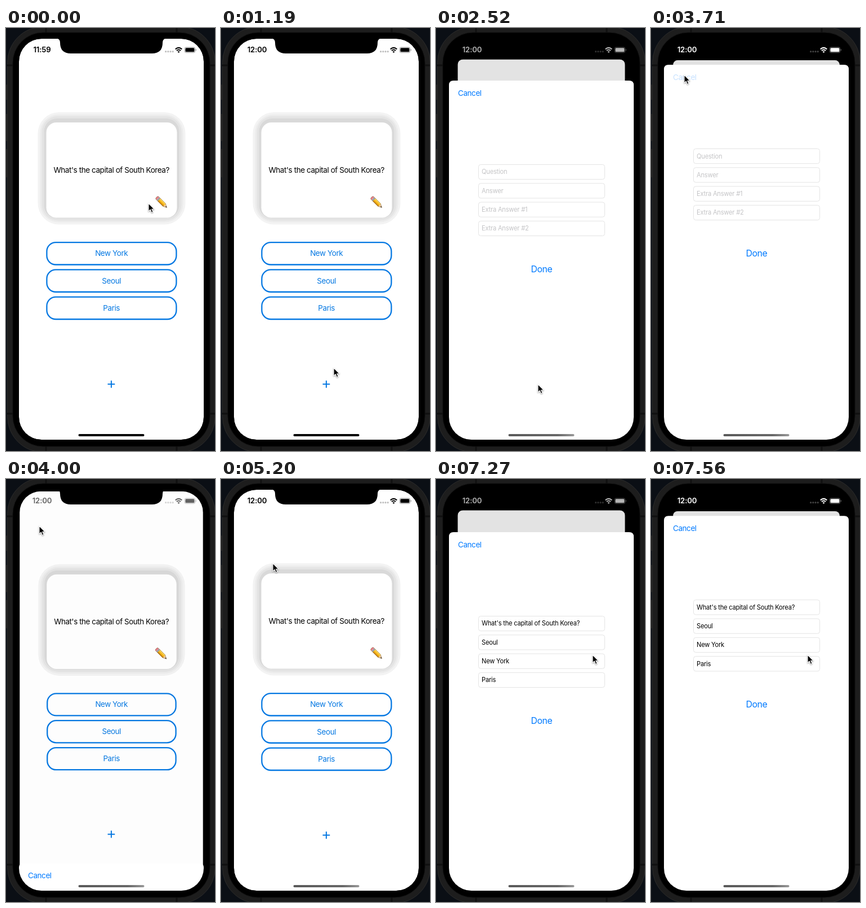
Write an HTML page that moves like this. It is 371 px wide and 748 px high and loops after 8 s.

```html
<!DOCTYPE html>
<html lang="en">
<head>
<meta charset="utf-8">
<title>Quiz card app</title>
<style>
html, body { margin: 0; width: 100%; height: 100%; overflow: hidden; background: #0b0f15; }
svg { display: block; }
text { font-family: Inter, Roboto, sans-serif; font-size: 13.47px; letter-spacing: -.031em; }
.mid { text-anchor: middle; }
.main-blue { fill: #0578e2; }
.blue { fill: #007aff; }
.clock { font-size: 13.2px; font-weight: 600; letter-spacing: -.01em; }
.field { font-size: 11.1px; letter-spacing: -.018em; }
.done { font-size: 15.85px; }
</style>
</head>
<body>
<svg width="371" height="748" viewBox="0 0 371 748">
  <defs>
    <clipPath id="screenClip"><rect x="23" y="19" width="328" height="709" rx="40"/></clipPath>
    <clipPath id="backClip"><rect id="backShape" x="23" y="19" width="328" height="709" rx="40"/></clipPath>
    <linearGradient id="homeGrey">
      <stop offset="0" stop-color="#5a5a5a"/>
      <stop offset=".75" stop-color="#686868"/>
      <stop offset="1" stop-color="#9a9a9a"/>
    </linearGradient>
  </defs>

  <!-- phone body -->
  <rect width="371" height="748" fill="#0b0f15"/>
  <path d="M0 100h3v27h-3zM0 152h3v48h-3zM0 214h3v50h-3z" fill="#1c1c1c"/>
  <rect x="2.5" y="-2.5" width="369" height="753" rx="64" fill="#1d1d1d" stroke="#2b2b2b"/>
  <path d="M2 66h10M2 682h10M362 66h9M362 682h9M71 0v8M303 0v8M71 740v8M303 740v8" stroke="#111" stroke-width="3"/>
  <rect x="12" y="8" width="350" height="732" rx="54" stroke="#111"/>

  <g clip-path="url(#screenClip)">
    <g id="back">
      <g clip-path="url(#backClip)">
        <rect x="23" y="19" width="328" height="709" fill="#fff"/>
        <g id="shadow"></g>
        <rect x="71.5" y="167" width="232" height="168.5" rx="18" fill="#fff"/>
        <text class="mid" x="187.2" y="256">What's the capital of South Korea?</text>
        <g transform="translate(285.5 317.5) rotate(45)">
          <path d="M0 0L-6.5 -3.2V3.2Z" fill="#f0c99a"/>
          <path d="M0 0L-2.6 -1.3V1.3Z" fill="#333"/>
          <rect x="-20" y="-3.3" width="14" height="6.6" fill="#f6b71c"/>
          <path d="M-20 -3.3h14v2h-14z" fill="#ffd95a"/>
          <path d="M-20 1.5h14v1.8h-14z" fill="#c8810f"/>
          <rect x="-22.5" y="-3.3" width="3" height="6.6" fill="#9aa3a8"/>
          <path d="M-22.5 -3.3h-1.4q-2 0 -2 3.3t2 3.3h1.4z" fill="#e8808a"/>
          <path d="M0 0L-6.5 -3.3H-23.9q-2 0 -2 3.3t2 3.3H-6.5Z" fill="none" stroke="#6b4a22" stroke-width=".5"/>
        </g>
        <g id="choices"></g>
        <path d="M180.5 629.8h12.8M186.9 623.4v12.8" stroke="#0578e2" stroke-width="2"/>
        <rect id="dim" x="23" y="19" width="328" height="709" opacity="0"/>
      </g>
    </g>
    <path d="M89 18q7 1 7 8q0 19 19 19h144q19 0 19 -19q0 -7 7 -8z"/>

    <g id="status">
      <text id="clock" class="clock mid" x="64" y="43.4">12:00</text>
      <g opacity=".25">
        <circle cx="283.6" cy="41.7" r="1.6"/><circle cx="287.8" cy="41.7" r="1.6"/>
        <circle cx="292" cy="41.7" r="1.6"/><circle cx="296.2" cy="41.7" r="1.6"/>
      </g>
      <g fill="none" stroke="currentColor" stroke-width="2">
        <path d="M300.7 37.6q5.8 -5.4 11.6 0"/>
        <path d="M302.9 40.1q3.6 -3.2 7.2 0"/>
      </g>
      <path d="M306.5 44l-2 -2.1q2 -1.7 4 0z"/>
      <rect x="317.1" y="34" width="18.6" height="9.6" rx="2.6" fill="none" stroke="currentColor" stroke-opacity=".4" stroke-width=".9"/>
      <rect x="318.4" y="35.3" width="16" height="7" rx="1.5"/>
      <path d="M336.6 37.2q1.4 .4 1.4 1.6t-1.4 1.6z" opacity=".45"/>
    </g>

    <g id="sheet">
      <path d="M23 728V73q0 -8 8 -8h312q8 0 8 8V728z" fill="#fff"/>
      <text id="cancel" class="blue" x="39" y="92">Cancel</text>
      <g id="fields"></g>
      <text class="blue done mid" x="187.4" y="404">Done</text>
    </g>
    <rect id="home" x="128.5" y="718" width="117" height="4" rx="2"/>
  </g>

  <path id="cursor" d="M0 0V14.2L3.3 11.2L5.5 16.4L8 15.3L5.8 10.3H10.2Z" stroke="#fff" stroke-width="1.1" stroke-linejoin="round" style="filter:drop-shadow(0 1px 1px #0006)"/>
</svg>

<script>
const LOOP = 8000, STEP = 148.3;
const $ = id => document.getElementById(id);
const clamp = v => Math.min(1, Math.max(0, v));

// banded shadow around the card
$('shadow').innerHTML = [[15, '#f3f3f3'], [11, '#ececec'], [8, '#e4e4e4'], [4, '#d9d9d9']].map(([s, c]) =>
  `<rect x="${71.5 - s}" y="${164 - s}" width="${232 + 2 * s}" height="${168.5 + 2 * s}" rx="${18 + s * 1.3}" fill="${c}"/>`).join('');

$('choices').innerHTML = ['New York', 'Seoul', 'Paris'].map((name, i) => {
  const y = 379.1 + i * 48.25;
  return `<rect x="72.4" y="${y}" width="230" height="39.4" rx="16" fill="none" stroke="#0578e2" stroke-width="2.3"/>
    <text class="main-blue mid" x="187.2" y="${y + 24.2}">${name}</text>`;
}).join('');

const hints = ['Question', 'Answer', 'Extra Answer #1', 'Extra Answer #2'];
const values = ["What's the capital of South Korea?", 'Seoul', 'New York', 'Paris'];
$('fields').innerHTML = hints.map((_, i) => {
  const y = 213.5 + i * 33.3;
  return `<rect x="75.5" y="${y}" width="224" height="26.2" rx="4" fill="#fff" stroke="#e4e4e4"/>
    <text class="field" x="81" y="${y + 17}"></text>`;
}).join('');
const labels = document.querySelectorAll('.field');

// cursor stops: step, x, y
const stops = [[0, 253, 310], [3, 253, 310], [10, 187, 673], [14, 181, 630], [18, 181, 630], [22, 59, 83],
  [34, 59, 83], [35, 92, 149], [36, 132, 242], [39, 132, 242], [43, 282, 315], [44, 278, 311], [54, 278, 311]];

function cursorAt(k) {
  const i = Math.max(1, stops.findIndex(s => s[0] >= k));
  const [a, b] = [stops[i - 1], stops[i]];
  const u = clamp((k - a[0]) / (b[0] - a[0]));
  const e = u * u * (3 - 2 * u);
  return [a[1] + (b[1] - a[1]) * e, a[2] + (b[2] - a[2]) * e];
}

// critically damped spring, 0 to 1
function spring(ms) {
  const x = Math.max(0, ms) * 0.01826;
  return 1 - (1 + x) * Math.exp(-x);
}

const OPEN = 2250, CLOSE = 3770, REOPEN = 6998;

function draw(time) {
  const k = Math.min(53, Math.floor((time + 5) / STEP));
  const t = k * STEP;

  const p = spring(t - OPEN) - spring(t - CLOSE) + spring(t - REOPEN);
  const tone = clamp((t - OPEN) / 380) - clamp((t - CLOSE) / 380) + clamp((t - REOPEN) / 380);

  $('sheet').setAttribute('transform', `translate(0 ${663 * (1 - p)})`);
  $('sheet').style.display = p > 0.001 ? '' : 'none';
  const scale = 1 - 0.098 * p;
  $('back').setAttribute('transform', `translate(187 ${19 + 38 * p}) scale(${scale}) translate(-187 -19)`);
  $('backShape').setAttribute('rx', 40 - 31 * p);
  $('dim').setAttribute('opacity', 0.115 * p);

  const v = Math.round(255 * tone);
  const ink = `rgb(${v},${v},${v})`;
  $('status').style.color = ink;
  $('status').style.fill = ink;
  $('clock').textContent = k < 2 ? '11:59' : '12:00';

  $('cancel').setAttribute('opacity', k === 25 ? 0.22 : 1);
  const filled = k >= 40;
  labels.forEach((el, i) => {
    el.textContent = (filled ? values : hints)[i];
    el.setAttribute('fill', filled ? '#000' : '#c4c4c6');
  });
  $('home').setAttribute('fill', k < 16 ? '#000' : 'url(#homeGrey)');

  const [x, y] = cursorAt(k);
  $('cursor').setAttribute('transform', `translate(${x.toFixed(1)} ${y.toFixed(1)})`);
}

const start = performance.now();
function tick() {
  draw((performance.now() - start) % LOOP);
  requestAnimationFrame(tick);
}
tick();
</script>
</body>
</html>
```
